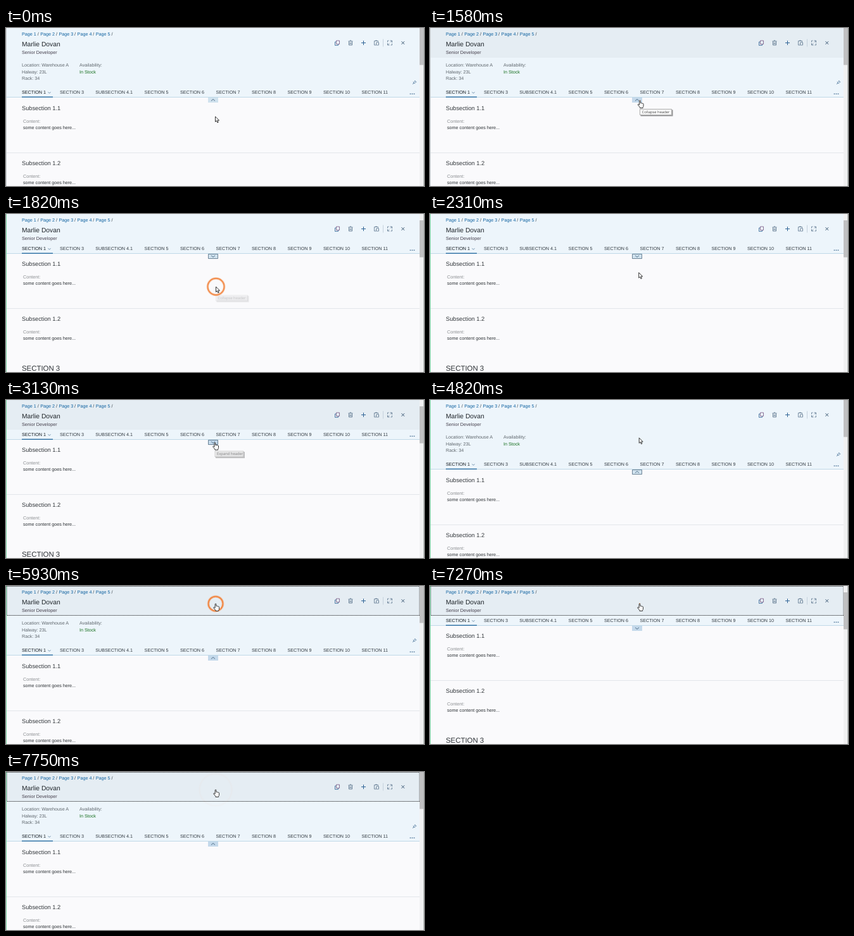
Recreate the animation shown at these times as an HTML page with a canvas. Size 660x250 px, loop 8000 ms.

```html
<!DOCTYPE html>
<html lang="en">
<head>
<meta charset="utf-8">
<title>Collapsible page header</title>
<style>
  html, body { margin: 0; width: 100%; height: 100%; overflow: hidden; background: #fafafc; }
  canvas { display: block; }
</style>
</head>
<body>
<canvas id="stage" width="660" height="250"></canvas>
<script>
const ctx = document.getElementById('stage').getContext('2d');
ctx.textRendering = 'geometricPrecision';

const LOOP = 8000, TOGGLE_DELAY = 240, RIPPLE = 490;
const CLICKS = [1580, 3890, 5720, 7270];
const INK = '#34526f', BLUE = '#2f6496', MUTED = '#5f676d';
const TABS = [['SECTION 1', 25], ['SECTION 3', 85], ['SUBSECTION 4.1', 141.3], ['SECTION 5', 218.6],
  ['SECTION 6', 275], ['SECTION 7', 331.5], ['SECTION 8', 388], ['SECTION 9', 444.5],
  ['SECTION 10', 501], ['SECTION 11', 561.5]];

// time, x, y of the pointer's hot spot
const PATH = [[0, 330.5, 140], [170, 330.5, 140], [660, 331.5, 115], [2050, 331.5, 115],
  [2370, 329.5, 90.5], [2410, 329.5, 90.5], [2730, 330, 67.5], [4680, 330, 67.5],
  [5180, 331, 28], [LOOP, 331, 28]];

const clamp = v => Math.max(0, Math.min(1, v));
const ease = v => v * v * (3 - 2 * v);

function pointerAt(t) {
  const i = PATH.findIndex((p, n) => n && t <= p[0]);
  const [t0, x0, y0] = PATH[i - 1], [t1, x1, y1] = PATH[i];
  const k = ease((t - t0) / (t1 - t0));
  return { x: x0 + (x1 - x0) * k, y: y0 + (y1 - y0) * k };
}

function rect(x, y, w, h, color) {
  ctx.fillStyle = color;
  ctx.fillRect(x, y, w, h);
}

// y is the middle of the capitals
function text(str, x, y, color, size = 7.2, family = '"Liberation Sans", Arial, sans-serif') {
  ctx.font = `${size}px ${family}`;
  ctx.fillStyle = color;
  ctx.fillText(str, x, y + size * 0.36 - 0.4);
}

function stroke(d, x, y, color = INK, width = 1) {
  ctx.save();
  ctx.translate(x, y);
  ctx.strokeStyle = color;
  ctx.lineWidth = width;
  ctx.stroke(new Path2D(d));
  ctx.restore();
}

function drawActions() {
  stroke('M-1.5-3.5h5v5.5h-5z', 523, 23.5, '#74527f', 0.8);
  stroke('M-1.5-1.5h-2v5.5h5v-2', 523, 23.5, BLUE, 0.8);
  stroke('M-3.5-2.5h7M-1.2-3.6h2.4M-2.5-2v5.5h5v-5.5M-.8-.5v2.6M.8-.5v2.6', 544, 23.5, INK, 0.7);
  stroke('M-3.5 0h7M0-3.5v7', 564.5, 23.5, BLUE);
  stroke('M-1 3.5h-2.5v-6.5h6v2M-1.8-3.6h2.6M-.5-.5h4v4h-4z', 585, 23.5, '#526d86', 0.75);
  stroke('M0-6v12', 595.5, 23.5, '#c5d2dd');
  stroke('M.5-3.5h3v3M3.5-3.5l-2.5 2.5M-.5 3.5h-3v-3M-3.5 3.5l2.5-2.5M-3.5-1v-2.5h2M3.5 1v2.5h-2', 606, 23.5, '#526d86', 0.75);
  stroke('M-2.3-2.3l4.6 4.6M2.3-2.3l-4.6 4.6', 626.8, 23.5, INK);
}

function drawTitle(s) {
  if (s.hover) rect(1, 0, 652, 47, '#e5edf3');
  for (let i = 0; i < 5; i++) {
    text(`Page ${i + 1}`, 25 + i * 29.2, 10.2, '#0f62a0');
    text('/', 49.7 + i * 29.2, 10.2, '#333f48');
  }
  text('Marlie Dovan', 25, 25.4, '#20262b', 10.3);
  text('Senior Developer', 25, 39, '#433d4a');
  drawActions();
  if (s.titleFocus) {
    ctx.setLineDash([1, 1]);
    stroke('M0 0h652v46h-652z', 1, 0.5, '#111');
    ctx.setLineDash([]);
  }
}

function drawDetails() {
  text('Location: Warehouse A', 25, 59.3, MUTED);
  text('Halway: 23L', 25, 69.6, MUTED);
  text('Rack: 34', 25, 80, MUTED);
  text('Availability:', 116, 59.3, MUTED);
  text('In Stock', 116, 70, '#187020');
  stroke('M-3 3l2.2-2.2M-2.2-.4l2.6 2.6M-1.2-.2l2-2M.3 1.4l2-2M.4-2.8l2.6 2.6', 645, 86, '#39658e', 0.8);
}

function drawTabs(edge) {
  const y = edge - 8.2;
  TABS.forEach(([label, x], i) => text(label, x, y, i ? '#333b42' : '#12191f'));
  stroke('M-2-1l2 2 2-2', 68.5, y + 0.5, '#4a7396', 0.8);
  rect(25, edge - 1.5, 49, 1.5, '#3576a8');
  for (let i = 0; i < 3; i++) rect(637.7 + i * 3, y + 1.8, 1.6, 1.4, '#4d7397');
}

function drawToggle(s) {
  const y = s.edge;
  rect(319, y, 16, 8, s.pressed ? '#437dac' : s.hover ? '#c4d9eb' : '#d0e2ee');
  if (s.toggleFocus && !s.pressed) stroke('M0 0h15v7h-15z', 319.5, y + 0.5, '#566e82', 0.8);
  const d = s.collapsed ? 'M-3-1.3l3 2.6 3-2.6' : 'M-3 1.3l3-2.6 3 2.6';
  stroke(d, 327, y + 4, s.pressed ? '#fff' : '#42627e', 0.9);
}

function drawContent(collapsed) {
  const shift = collapsed ? -48 : 0;
  for (let i = 0; i < 2; i++) {
    const y = shift + i * 87.2;
    text(`Subsection 1.${i + 1}`, 25, 127.2 + y, '#33383c', 9.25);
    text('Content:', 27, 148 + y, '#8a8d90');
    text('some content goes here...', 27, 158 + y, '#2c3135');
  }
  rect(1, 197 + shift, 652, 1, '#e3e6ea');
  text('SECTION 3', 25, 292.6 + shift, '#2d3236', 11.4);
}

function drawTooltip(label, x, y, w, alpha) {
  if (alpha <= 0) return;
  ctx.globalAlpha = alpha;
  rect(x + 1.5, y + 1.5, w, 10, 'rgba(0,0,0,.4)');
  rect(x, y, w, 10, '#fff');
  stroke(`M0 0h${w - 1}v9h${1 - w}z`, x + 0.5, y + 0.5, '#848484', 0.7);
  text(label, x + 3.5, y + 5.2, '#444', 5.85, '"Open Sans", sans-serif');
  ctx.globalAlpha = 1;
}

function drawRipple(t) {
  CLICKS.forEach((start, i) => {
    const age = t - start, last = i === CLICKS.length - 1;
    if (age < 0 || (age > RIPPLE - 30 && !last)) return;
    const k = Math.min(age, 480), p = pointerAt(start);
    ctx.globalAlpha = Math.max(0.02, 1 - (k / (RIPPLE - 8)) ** 3);
    ctx.beginPath();
    ctx.arc(p.x, p.y, 0.5 + k * 0.052, 0, 7);
    ctx.strokeStyle = 'rgba(250,165,110,.4)';
    ctx.lineWidth = Math.min(4, 1 + k * 0.05);
    ctx.stroke();
    ctx.strokeStyle = '#f0843f';
    ctx.lineWidth *= 0.55;
    ctx.stroke();
    ctx.globalAlpha = 1;
  });
}

function drawPointer({ x, y }, hand) {
  const shape = new Path2D(hand
    ? 'M-.9.5q.9-1 1.8 0v3.4q1-.6 1.7.2 1-.5 1.6.3 1.3-.2 1.3 1v2.8q0 1.3-.9 2.1v1.2h-4.7v-1.2l-2.9-3.4q-.6-1.2.4-1.4.8 0 1.7 1.2z'
    : 'M0 0v8.4l1.9-1.7 1.4 3.1 1.4-.6-1.4-3h2.7z');
  ctx.save();
  ctx.translate(x, y);
  ctx.fillStyle = '#fff';
  ctx.fill(shape);
  ctx.strokeStyle = '#222';
  ctx.lineWidth = 0.9;
  ctx.stroke(shape);
  ctx.restore();
}

function draw(t) {
  const toggles = CLICKS.filter(c => t >= c + TOGGLE_DELAY).length;
  const collapsed = toggles % 2 === 1;
  const edge = collapsed ? 63 : 110;
  const pointer = pointerAt(t);
  const overToggle = pointer.y >= edge && pointer.y < edge + 9;
  const hover = overToggle || pointer.y < 47;
  const pressing = CLICKS.some(c => t > c + 60 && t < c + TOGGLE_DELAY);
  const s = {
    collapsed, edge, hover,
    pressed: pressing && overToggle,
    titleFocus: t > CLICKS[2] + 30,
    toggleFocus: t > CLICKS[0] + 60 && t <= CLICKS[2] + 30
  };

  rect(0, 0, 660, 250, '#fafafc');
  drawContent(collapsed);
  rect(1, 0, 652, edge, '#edf5fb');
  rect(1, edge - 1, 652, 1, '#c0d9e8');
  drawTitle(s);
  if (!collapsed) drawDetails();
  drawTabs(edge);
  drawToggle(s);
  rect(0, 0, 1, 250, toggles ? '#7ed9a8' : '#c9ced2');
  rect(653, 0, 6, 250, '#f1f1f2');
  rect(653, collapsed ? 10 : 0, 6, 58.5, '#c0c0c1');
  rect(659, 0, 1, 250, '#b4bab8');

  drawTooltip('Collapse header', 331, 128, 51, clamp((t - 960) / 140) * clamp((1880 - t) / 300));
  drawTooltip('Expand header', 329.5, 80.5, 46, clamp((t - 3030) / 170) * clamp((4190 - t) / 300));
  drawRipple(t);
  drawPointer(pointer, hover);
}

const origin = performance.now();
function tick() {
  draw((performance.now() - origin) % LOOP);
  requestAnimationFrame(tick);
}
tick();
</script>
</body>
</html>
```
